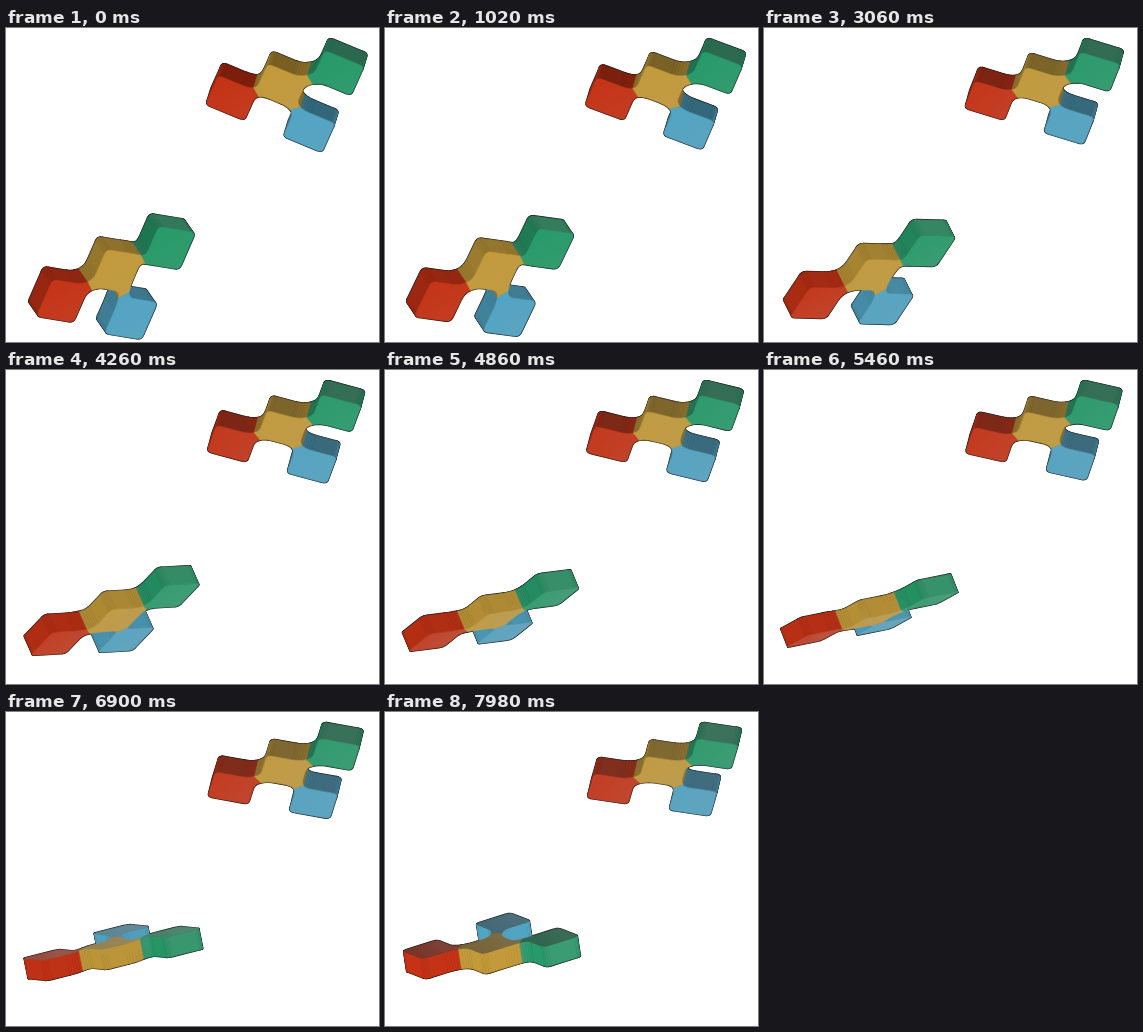
These frames come from a looping animation (373x314 px, 8 s). An HTML page with a canvas:

```html
<!DOCTYPE html>
<html lang="en">
<head>
<meta charset="utf-8">
<title>Turning blocks</title>
<style>
  html, body { margin: 0; width: 100%; height: 100%; overflow: hidden; background: #fff; }
  canvas { display: block; width: 373px; height: 314px; }
</style>
</head>
<body>
<canvas id="stage"></canvas>
<script>
const LOOP = 8000, STEP = 60;
const WIDTH = 373, HEIGHT = 314;
const canvas = document.getElementById('stage');
const ctx = canvas.getContext('2d');
const ratio = window.devicePixelRatio || 1;
canvas.width = WIDTH * ratio;
canvas.height = HEIGHT * ratio;

const RED = 0, YELLOW = 1, GREEN = 2, BLUE = 3;
const COLORS = [[198, 48, 18], [196, 154, 56], [36, 154, 104], [80, 164, 196]];
const DRAW_ORDER = [BLUE, GREEN, RED, YELLOW];

// Square corners run clockwise: 0 top left, 1 top right, 2 bottom right, 3 bottom left.
const JOINTS = [
  { 1: YELLOW },
  { 1: GREEN, 2: BLUE, 3: RED },
  { 3: YELLOW },
  { 0: YELLOW }
];
const DIRECTIONS = [[1, 0], [0, 1], [-1, 0], [0, -1]];
const CORNERS = [[-.5, -.5], [.5, -.5], [.5, .5], [-.5, .5]];

// Row: time, edge across, edge down, depth, then the centres of red, yellow, green, blue.
const LOWER = [
  [0,    37, 6,    -16, 37,  -9, -13,  57, 273,   111, 243,   163, 220,   125, 290],
  [1980, 36, 4,    -18, 34,  -9, -14,  55, 274,   111, 244,   163, 222,   124, 287],
  [3060, 36, 1,    -20, 30,  -8, -16,  54, 275,   111, 247,   164, 223,   122, 281],
  [4260, 35, -2,   -22, 23,  -8, -18,  53, 273,   112, 250,   166, 226,   120, 270],
  [5460, 35, -7,   -22, 12,  -7, -18,  50.5, 268, 109, 251,   167, 231,   120, 256],
  [6900, 36, -9,   -21, -2,  -4, -20,  49, 263,   108, 252,   170, 240,   119, 238],
  [7980, 35, -11,  -21, -8,  -3, -20,  48, 257.5, 108, 252.5, 169, 245.5, 121, 230.5]
];
const UPPER = [
  [0,    39, 16,  -13, 29,  4, -13,  225.5, 70, 275, 58.5, 332, 45, 303, 102],
  [7980, 41, 6,   -7, 24,   4, -17,  226, 77,   278, 59.5, 329, 42, 308, 89]
];

const lerp = (a, b, k) => a + (b - a) * k;
const cross = (a, b) => a[0] * b[1] - a[1] * b[0];
const add = (p, q, k = 1) => [p[0] + q[0] * k, p[1] + q[1] * k];

function poseAt(rows, time) {
  let i = 0;
  while (i < rows.length - 2 && time > rows[i + 1][0]) i++;
  const k = (time - rows[i][0]) / (rows[i + 1][0] - rows[i][0]);
  const v = rows[i].map((n, j) => lerp(n, rows[i + 1][j], k));
  const pair = j => [v[j], v[j + 1]];
  return { across: pair(1), down: pair(3), depth: pair(5), centers: [7, 9, 11, 13].map(pair) };
}

// Light: [darkness, grey sheen] for each kind of face.
function lowerLight(time) {
  const p = time / LOOP, late = Math.max(0, (time - 5800) / 2180);
  return {
    front: [0, .03 + .4 * p * p],
    back: [lerp(.1, .45, late), lerp(.45, .2, late)],
    top: [.28 * (1 - p), .03],
    left: [.24 * (1 - p), .02]
  };
}
function upperLight(time) {
  const p = time / LOOP;
  return { front: [0, .02 + .1 * p], back: [.4, 0], top: [.38, .12 * p], left: [.22, .03] };
}

function shade(color, [dark, sheen]) {
  return `rgb(${color.map(c => Math.round(lerp(c * (1 - dark), 165, sheen))).join()})`;
}

function curve(start, control, end, steps = 5) {
  return Array.from({ length: steps + 1 }, (_, i) => {
    const k = i / steps, m = 1 - k;
    return [0, 1].map(j => m * m * start[j] + 2 * m * k * control[j] + k * k * end[j]);
  });
}

// Square with rounded corners; joined corners flare into half of a neck.
function outline(block, pose) {
  const { across, down, centers } = pose;
  const round = .13, flare = .38, neck = .1;
  const project = (p, origin) => add(add(origin, across, p[0]), down, p[1]);
  const points = [];
  CORNERS.forEach((corner, i) => {
    const into = DIRECTIONS[(i + 3) % 4], out = DIRECTIONS[i];
    const at = (dir, k) => project(add(corner, dir, k), centers[block]);
    const other = JOINTS[block][i];
    if (other === undefined) {
      points.push(...curve(at(into, -round), at(into, 0), at(out, round)));
      return;
    }
    const middle = centers[block].map((n, j) => (n + centers[other][j]) / 2);
    const side = add(into, out);
    const near = project(side.map(n => -n * neck), middle);
    const far = project(side.map(n => n * neck), middle);
    const first = curve(at(into, -flare), at(into, -2 * neck), near);
    first[first.length - 1].cut = true;
    points.push(...first, ...curve(far, at(out, 2 * neck), at(out, flare)));
  });
  return points;
}

function facesOf(block, pose, light) {
  const { across, down, depth } = pose;
  const color = COLORS[block], points = outline(block, pose);
  const area = cross(across, down);
  const faces = [];
  points.forEach((p, i) => {
    const q = points[(i + 1) % points.length];
    const edge = add(q, p, -1);
    if (p.cut || cross(edge, depth) >= 0) return;
    const u = Math.abs(cross(edge, down)), v = Math.abs(cross(across, edge));
    const topness = u / (u + v || 1);
    const tone = light.left.map((n, j) => lerp(n, light.top[j], topness));
    if (block === GREEN) tone[1] += .14 * topness;
    faces.push({ points: [p, q, add(q, depth), add(p, depth)], fill: shade(color, tone) });
  });

  const isFront = area > 0;
  const cap = isFront ? points : points.map(p => add(p, depth));
  const center = isFront ? pose.centers[block] : add(pose.centers[block], depth);
  const tone = isFront ? light.front : light.back;
  const start = add(add(center, across, -.4), down, -.4);
  const end = add(add(center, across, .4), down, .4);
  const fill = ctx.createLinearGradient(...start, ...end);
  fill.addColorStop(0, shade(color, tone));
  fill.addColorStop(1, shade(color, [tone[0], tone[1] + .07]));
  faces.push({ points: cap, fill });
  return faces;
}

function trace(points) {
  ctx.beginPath();
  points.forEach(p => ctx.lineTo(...p));
  ctx.closePath();
}

function drawModel(pose, light) {
  const faces = DRAW_ORDER.flatMap(block => facesOf(block, pose, light));
  // Dark rim, later covered everywhere except around the silhouette.
  ctx.lineJoin = 'round';
  ctx.lineWidth = 1.7;
  ctx.strokeStyle = '#111';
  for (const face of faces) {
    trace(face.points);
    ctx.stroke();
  }
  ctx.lineWidth = .6;
  for (const face of faces) {
    trace(face.points);
    ctx.fillStyle = ctx.strokeStyle = face.fill;
    ctx.fill();
    ctx.stroke();
  }
}

function frame(now) {
  const time = Math.floor(now % LOOP / STEP) * STEP;
  ctx.setTransform(ratio, 0, 0, ratio, 0, 0);
  ctx.fillStyle = '#fff';
  ctx.fillRect(0, 0, WIDTH, HEIGHT);
  drawModel(poseAt(UPPER, time), upperLight(time));
  drawModel(poseAt(LOWER, time), lowerLight(time));
  requestAnimationFrame(frame);
}
requestAnimationFrame(frame);
</script>
</body>
</html>
```
